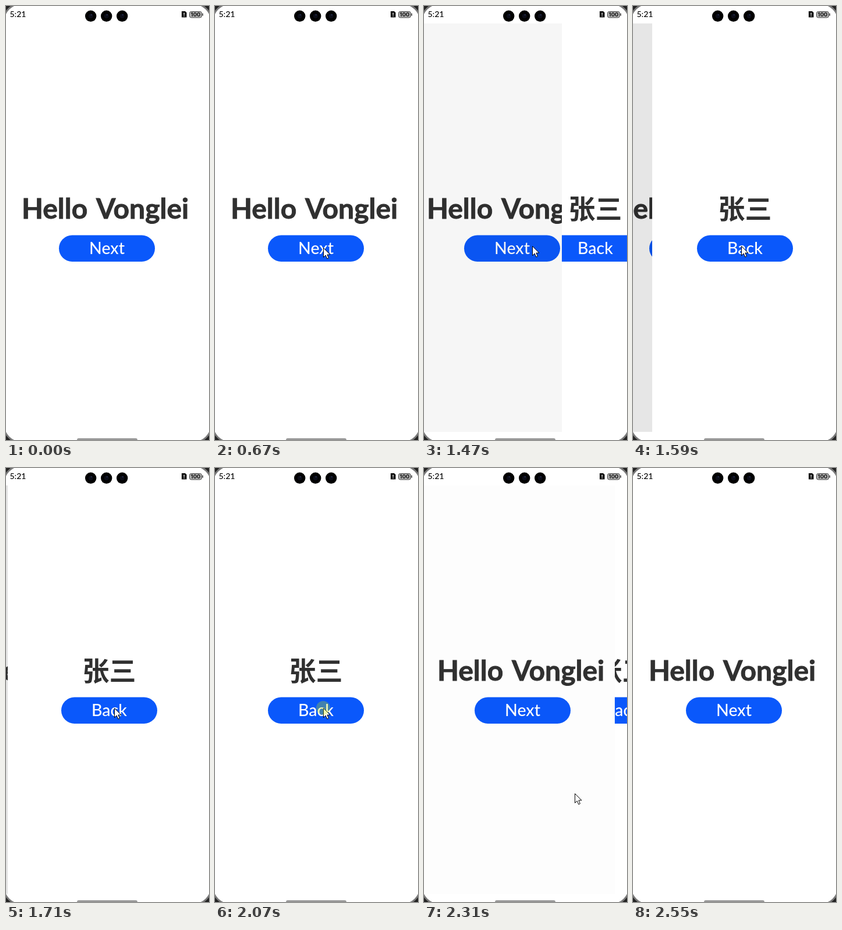
An HTML page that plays this animation: 349 px wide and 747 px high, repeating every 2.81 s.

```html
<!DOCTYPE html>
<html lang="en">
<head>
<meta charset="utf-8">
<title>Page transition</title>
<style>
  html, body { margin: 0; width: 100%; height: 100%; overflow: hidden; background: #fff; }
  svg { display: block; width: 100vw; height: 100vh; }
  text { font-family: Lato, "Open Sans", sans-serif; }
  .title { font-size: 48px; font-weight: 700; fill: #303030; }
  .latin { stroke: #303030; stroke-width: .9px; }
  .cjk { font-family: "Noto Sans CJK SC", "Noto Sans CJK", sans-serif; font-size: 46px; text-anchor: middle; }
  .button { fill: #0a58fb; }
  .label { font-size: 28.5px; font-weight: 500; fill: #fff; text-anchor: middle; }
  .clock { font-size: 14px; font-weight: 500; fill: #000; }
  .charge { font-family: Inter, sans-serif; font-size: 9.5px; font-weight: 700; text-anchor: middle; fill: #111; }
</style>
</head>
<body>
<svg viewBox="0 0 349 747" preserveAspectRatio="none">
  <defs>
    <clipPath id="body"><rect y="30" width="349" height="703"/></clipPath>
    <clipPath id="reveal"><rect id="edge" x="349" y="30" width="349" height="703"/></clipPath>
    <rect id="pill" class="button" x="91" y="394.500" width="165" height="45.500" rx="22.750"/>
    <g id="lens">
      <circle r="9.7"/>
      <circle r="4" fill="#0b0d18"/>
      <circle cx="1" cy="-2" r="1" fill="#2b3358"/>
    </g>
  </defs>

  <rect width="349" height="747" fill="#222"/>
  <rect x="-4" y="-4" width="357" height="755" rx="30" fill="#fff" stroke="#777" stroke-width="3"/>

  <g clip-path="url(#body)">
    <g id="first">
      <text class="title latin" y="366"><tspan x="27">Hello</tspan> <tspan x="155">Vonglei</tspan></text>
      <use href="#pill"/>
      <text class="label" x="173.5" y="427">Next</text>
    </g>
    <rect id="shade" y="30" width="349" height="703" opacity="0"/>
  </g>

  <g clip-path="url(#reveal)">
    <rect y="30" width="349" height="703" fill="#fff"/>
    <g id="second">
      <text class="title cjk" x="173.5" y="366">张三</text>
      <use href="#pill"/>
      <text class="label" x="173.5" y="427">Back</text>
    </g>
  </g>

  <text class="clock" x="6.5" y="19">5:21</text>
  <use href="#lens" x="145.700" y="17.300"/>
  <use href="#lens" x="172.700" y="17.300"/>
  <use href="#lens" x="199.700" y="17.300"/>
  <path d="M302 9h6l2.500 2.500V19.500h-8.500z"/>
  <path d="M306.200 11.500v4M306.200 16.500v1.500" stroke="#fff" stroke-width="1.400"/>
  <rect x="315.500" y="9.500" width="21" height="10.500" rx="3" fill="#b4b4b4" stroke="#444"/>
  <rect x="337.500" y="12.500" width="1.500" height="4.500" rx=".7" fill="#444"/>
  <text class="charge" x="326" y="18.200">100</text>
  <rect x="122" y="744" width="104" height="6" rx="3" fill="#999"/>

  <path id="cursor" d="M.5 .5V16.500L4.200 13L6.800 19L9.400 17.800L6.900 12H12z"
        fill="#fff" stroke="#000" stroke-linejoin="round"/>
  <circle id="touch" cx="186" cy="413" r="12" fill="#c8e600" opacity="0"/>
</svg>
<script>
const LOOP = 2810, W = 349;
const PUSH = 1420.5, PUSHED = 1830, POP = 2116, POPPED = 2490;
const taps = [1290, 2010];
// time, x, y of the pointer after it reaches the button
const path = [
  [610, 186, 421], [670, 186, 416], [810, 186, 414], [990, 186, 413],
  [2130, 186, 413], [2190, 217, 448], [2490, 322, 728]
];
const $ = id => document.getElementById(id);
const mix = (a, b, k) => a + (b - a) * k;

// The screen refreshes in steps rather than continuously
const snap = t => t < 810
  ? 140 + Math.floor((t - 140) / 58.75 + 1e-6) * 58.75
  : 30 + Math.floor((t - 30) / 60) * 60;

// Critically damped spring from 0 to 1
function spring(ms) {
  const k = Math.max(0, ms) * 0.0233;
  return 1 - (1 + k) * Math.exp(-k);
}

function progress(t) {
  if (t < PUSHED) return spring(t - PUSH);
  if (t < POP) return 1;
  return t < POPPED ? 1 - spring(t - POP) : 0;
}

function pointer(t) {
  if (t < 610) {
    const k = 1 - (1 - (t - 140) / 470) ** 2;
    return [mix(276, 186, k), mix(651, 421, k)];
  }
  const i = Math.max(1, path.findIndex(p => p[0] >= t));
  const [a, b] = [path[i - 1], path[i]];
  const k = (t - a[0]) / (b[0] - a[0]);
  return [mix(a[1], b[1], k), mix(a[2], b[2], k)];
}

function tapAlpha(t) {
  const age = t - taps[t < taps[1] ? 0 : 1];
  if (age < 0 || age >= 120) return 0;
  return age < 60 ? 0.5 : 0.3;
}

const move = (id, x, y = 0) =>
  $(id).setAttribute("transform", `translate(${Math.round(x)} ${Math.round(y)})`);

function draw(now) {
  const t = snap(now % LOOP);
  const p = progress(t), edge = Math.round(W * (1 - p));
  const resting = t >= PUSHED && t < POP;

  move("first", -0.2 * W * p);
  $("shade").setAttribute("opacity", 0.11 * p);
  $("edge").setAttribute("x", edge);
  move("second", resting ? 0 : edge / 2 + 2.5);

  const shown = t >= 140 && t < 2550;
  $("cursor").setAttribute("visibility", shown ? "visible" : "hidden");
  if (shown) move("cursor", ...pointer(t));
  $("touch").setAttribute("opacity", tapAlpha(t));
}

const start = performance.now();
function tick() {
  draw(performance.now() - start);
  requestAnimationFrame(tick);
}
tick();
</script>
</body>
</html>
```
